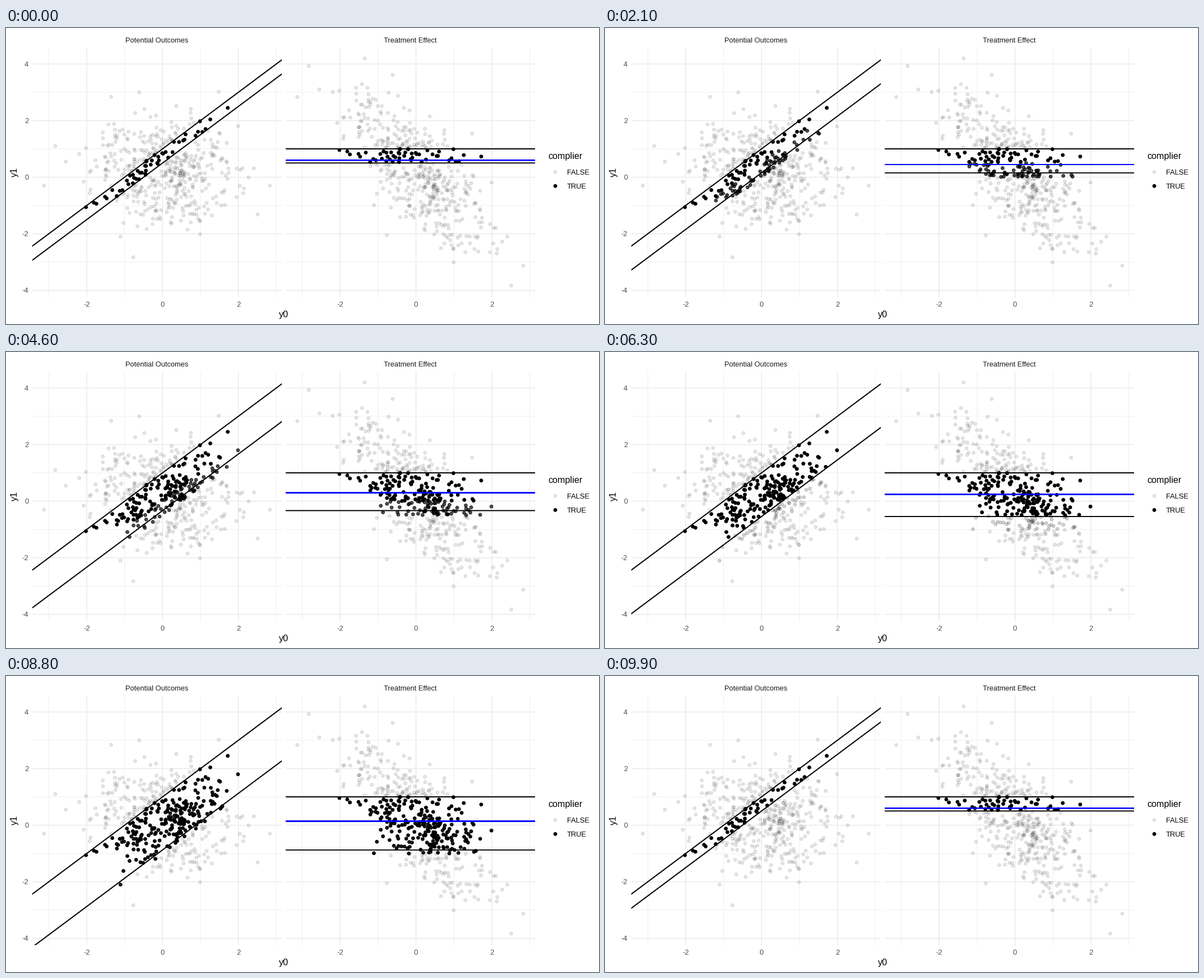
Recreate the animation shown at these times as a matplotlib script. Size 1058x529 px, loop 10000 ms.

```python
import matplotlib.pyplot as plt
import numpy as np
from matplotlib.animation import FuncAnimation

W, H, DPI = 1058, 529, 105.8
FRAMES, INTERVAL = 100, 100
PX = 72 / DPI  # one pixel in points
XLIM, YLIM = (-3.434, 3.137), (-4.23, 4.59)
TOP, BOTTOM = 34.5, 480.5
PANELS = [(47.0, 491.5), (499.2, 943.7)]

LOWER = np.linspace(0.5, -1, 4)
MEAN = [0.6, 0.373, 0.256, 0.10]
MOVES = [(12, 25), (38, 50), (62, 74), (87, 99)]

# A few far-out points that fix the extent of the cloud, as (y0, y1)
RIM = [(-3.13, -.3), (-2.83, 1.1), (-2.55, .55), (-1.355, 2.84), (-.615, 3.0),
       (1.48, 3.02), (1.72, 2.45), (1.99, 1.8), (2.41, .31), (2.83, -.3),
       (2.51, -1.32), (.99, -2.02), (-.77, -2.83), (-1.11, -2.1), (-2.02, -1.06)]

plt.rcParams["font.family"] = "Liberation Sans"


def first_state(gain):
    """Index of the first state counting each point as a complier, 4 if none."""
    return np.select([(gain > low) & (gain < 1) for low in LOWER], range(4), 4)


def sample(n=470, seed=11):
    """Round normal cloud, later compliers first so early ones lie on top."""
    pool = np.random.default_rng(seed).normal(size=(2 * n, 2))
    pool = pool[np.hypot(*pool.T) < 2.3] + (0, 0.25)
    pts = np.vstack([RIM, pool[:n]])
    order = np.argsort(-first_state(pts[:, 1] - pts[:, 0]), kind="stable")
    return pts[order].T


def phase(i):
    """State left, state entered and the share of the way between them."""
    for k, (start, end) in enumerate(MOVES):
        if i <= end:
            return k, (k + 1) % 4, max(0, i - start) / (end - start)


def mix(a, b, t):
    return a + (b - a) * t


def black(alpha):
    rgba = np.zeros((len(alpha), 4))
    rgba[:, 3] = alpha
    return rgba


def dots(ax, x, y, alpha):
    colors = black(alpha)
    return ax.scatter(x, y, s=3.91 ** 2, facecolors=colors, edgecolors=colors,
                      linewidths=1.04 * PX, zorder=2)


def stack(ax, n, color="black"):
    """Coincident lines, whose overlap hardens the edges."""
    return [ax.plot([], [], color=color, lw=1.57 * PX, snap=False, zorder=3)[0]
            for _ in range(n)]


def place(lines, y, slope=0):
    x = np.array(XLIM) + (-0.1, 0.1)
    for line in lines:
        line.set_data(x, y + slope * x)


def panel(left, right):
    ax = fig.add_axes([left / W, 1 - BOTTOM / H, (right - left) / W, (BOTTOM - TOP) / H])
    ax.set(xlim=XLIM, ylim=YLIM)
    ax.axis("off")
    for v in range(-4, 5):
        lw = (1.57 if v % 2 == 0 else 0.785) * PX
        style = dict(color="#ebebeb", lw=lw, zorder=0, snap=False)
        ax.axhline(v, **style)
        if abs(v) < 4:
            ax.axvline(v, **style)
    return ax


def label(x, y, text, size=8.8, color="black", ha="center", **kw):
    stage.text(x, y, text, size=size, color=color, ha=ha,
               **{"va": "baseline", **kw})


fig = plt.figure(figsize=(W / DPI, H / DPI), dpi=DPI, facecolor="white")
stage = fig.add_axes([0, 0, 1, 1])
stage.set(xlim=(0, W), ylim=(H, 0))
stage.axis("off")

outcome, effect = [panel(*p) for p in PANELS]
for (left, right), title in zip(PANELS, ["Potential Outcomes", "Treatment Effect"]):
    label((left + right) / 2, 26, title, color="#1a1a1a")
    for v in (-2, 0, 2):
        x = np.interp(v, XLIM, (left, right))
        label(x, 497.5, f"{v}", color="#4d4d4d")
for v in range(-4, 5, 2):
    y = np.interp(v, YLIM, (BOTTOM, TOP))
    label(40.3, y + 4.6, f"{v}", color="#4d4d4d", ha="right")
label(495.2, 516.5, "y0", 11)
label(22.5, 257.5, "y1", 11, rotation=90, ha="right", va="center")
label(967, 234, "complier", 11, ha="left")
for y, text in [(257.2, "FALSE"), (282.4, "TRUE")]:
    label(1001, y + 4.7, text, ha="left")
dots(stage, [980, 980], [257.2, 282.4], [0.1, 1])

y0, y1 = sample()
gain = y1 - y0
entry = first_state(gain)
clouds = [dots(ax, y0, y, np.full(len(y0), 0.1))
          for ax, y in [(outcome, y1), (effect, gain)]]

place(stack(outcome, 3), 1, slope=1)
place(stack(effect, 6), 1)
low_diagonal = stack(outcome, 3)
low_level = stack(effect, 2)
mean_level = stack(effect, 16, "blue")


def update(i):
    a, b, t = phase(i)
    colors = black(mix(0.1, 1, mix(1.0 * (entry <= a), 1.0 * (entry <= b), t)))
    for cloud in clouds:
        cloud.set_facecolors(colors)
        cloud.set_edgecolors(colors)
    low = mix(LOWER[a], LOWER[b], t)
    place(low_diagonal, low, slope=1)
    place(low_level, low)
    place(mean_level, mix(MEAN[a], MEAN[b], t))
    return [*clouds, *low_diagonal, *low_level, *mean_level]


anim = FuncAnimation(fig, update, frames=FRAMES, interval=INTERVAL,
                     repeat=True, repeat_delay=0, blit=False)
plt.show()
```
